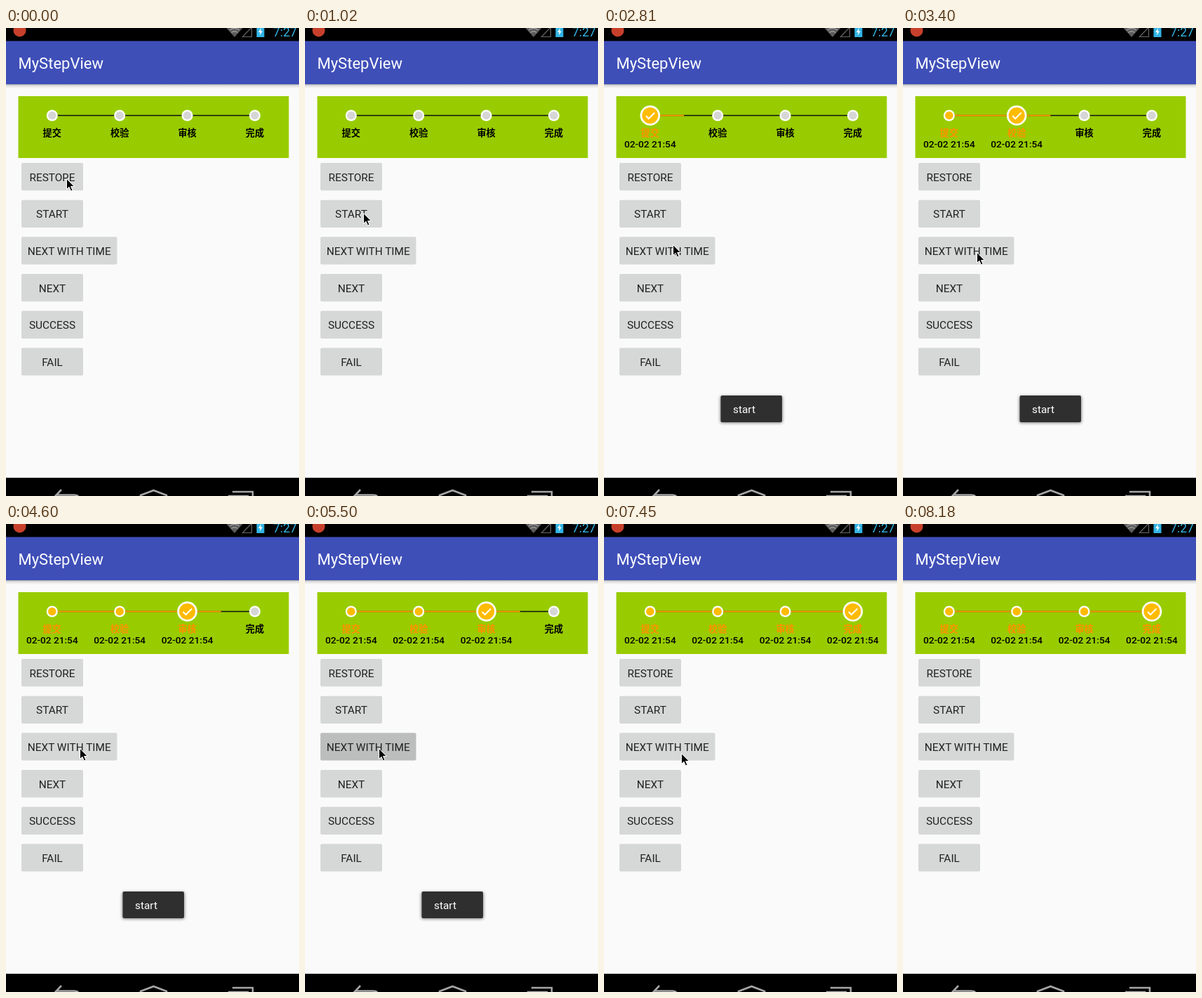
Animation of 418x666 px, one loop 8.84 s. Source, as an HTML page:

```html
<!DOCTYPE html>
<html lang="zh-CN">
<head>
<meta charset="utf-8">
<title>MyStepView</title>
<style>
  html, body { margin: 0; width: 100%; height: 100%; overflow: hidden; background: #fafafa; }
  svg { display: block; width: 100%; height: 100%; }
  text { font-family: Roboto, "Noto Sans CJK SC", "Noto Sans CJK", sans-serif; }
  .title { font-size: 22px; fill: #fff; }
  .clock { font-size: 17.6px; fill: #33b5e5; }
  .button rect { fill: #d6d7d7; }
  .button text { font-size: 15.4px; fill: #212121; text-anchor: middle; }
  .label { font-size: 13.2px; font-weight: 700; text-anchor: middle; }
  .time { font-size: 13.7px; font-weight: 500; text-anchor: middle; }
  .toast text { font-size: 15.4px; fill: #fff; }
  .nav { fill: none; stroke: #a6a6a6; stroke-width: 2.6; }

  .state, .cursor, .toast, .button rect { animation: 8840ms step-end infinite; }
  .state { visibility: hidden; }
  .state0 { animation-name: state0; }
  .state1 { animation-name: state1; }
  .state2 { animation-name: state2; }
  .state3 { animation-name: state3; }
  .state4 { animation-name: state4; }
  .restore rect { animation-name: pressRestore; }
  .start rect { animation-name: pressStart; }
  .timed rect { animation-name: pressTimed; }
  .cursor { animation-name: cursor; }
  .toast { animation-name: toast; }

  @keyframes state0 { 0% { visibility: visible } 21.71%, 100% { visibility: hidden } }
  @keyframes state1 { 0% { visibility: hidden } 21.71% { visibility: visible } 38.46%, 100% { visibility: hidden } }
  @keyframes state2 { 0% { visibility: hidden } 38.46% { visibility: visible } 52.03%, 100% { visibility: hidden } }
  @keyframes state3 { 0% { visibility: hidden } 52.03% { visibility: visible } 63.91%, 100% { visibility: hidden } }
  @keyframes state4 { 0% { visibility: hidden } 63.91%, 100% { visibility: visible } }

  @keyframes pressRestore { 0% { fill: #d6d7d7 } 1.58% { fill: #bcbdbd } 3.28%, 100% { fill: #d6d7d7 } }
  @keyframes pressStart { 0% { fill: #d6d7d7 } 20.02% { fill: #bcbdbd } 21.71%, 100% { fill: #d6d7d7 } }
  @keyframes pressTimed {
    0%, 38.46%, 52.03%, 63.91%, 100% { fill: #d6d7d7 }
    36.76%, 48.64%, 62.21% { fill: #bcbdbd }
  }

  @keyframes toast {
    0% { opacity: 0 }
    23.41% { opacity: .38 }
    25.11% { opacity: .78 }
    26.8% { opacity: 1 }
    63.91% { opacity: .6 }
    65.61% { opacity: .2 }
    67.3%, 100% { opacity: 0 }
  }

  @keyframes cursor {
    0% { transform: translate(86px, 214px) }
    4.86% { transform: translate(90px, 226px) }
    6.56% { transform: translate(101px, 256px) }
    8.25% { transform: translate(107px, 288px) }
    9.84% { transform: translate(94px, 275px) }
    11.53% { transform: translate(83px, 263px) }
    28.5% { transform: translate(85px, 270px) }
    30.2% { transform: translate(91px, 291px) }
    31.78% { transform: translate(98px, 308px) }
    33.48% { transform: translate(105px, 319px) }
    84.27% { transform: translate(110px, 326px) }
    85.97% { transform: translate(142px, 370px) }
    87.55% { transform: translate(198px, 450px) }
    89.25% { transform: translate(262px, 550px) }
    90.95% { transform: translate(315px, 640px) }
    92.53%, 100% { transform: translate(340px, 690px) }
  }
</style>
</head>
<body>
<svg viewBox="0 0 418 666" preserveAspectRatio="none">
  <defs>
    <linearGradient id="shade" x2="0" y2="1">
      <stop stop-opacity=".3"/>
      <stop offset=".4" stop-opacity=".1"/>
      <stop offset="1" stop-opacity="0"/>
    </linearGradient>
    <filter id="blur" x="-20%" y="-40%" width="140%" height="180%"><feGaussianBlur stdDeviation="2"/></filter>
  </defs>

  <rect width="418" height="666" fill="#fafafa"/>
  <rect y="80" width="418" height="6" fill="url(#shade)"/>
  <rect y="18" width="418" height="62" fill="#3f4fb8"/>
  <text class="title" x="17.5" y="58">MyStepView</text>

  <g id="status">
    <rect width="418" height="18.5"/>
    <circle cx="19.5" cy="3.5" r="9" fill="#c8402c"/>
    <path d="M314.500 0L326 13L337.500 0Z" fill="#5c5c5c"/>
    <path d="M319 3Q326-2 333 3M321.500 6.500Q326 3 330.500 6.500" fill="none" stroke="#999" stroke-width="1.500"/>
    <path d="M337.500 12.500H350.500V-1Z" fill="none" stroke="#666" stroke-width="1.200"/>
    <rect x="357.500" y="-4" width="11" height="17" fill="#33b5e5"/>
    <path d="M364 0L360 6H362.700L361.800 10.500L366 4.500H363.300Z" fill="#fff"/>
    <text class="clock" x="381" y="11.500">7:27</text>
  </g>

  <rect x="17.500" y="97" width="386" height="88" fill="#98cc00"/>
  <g id="steps"></g>
  <g id="buttons"></g>

  <g class="toast">
    <rect x="166" y="524" width="88.500" height="38" rx="2" opacity=".5" filter="url(#blur)"/>
    <rect x="166.500" y="523" width="87.500" height="38" rx="2" fill="#2f2f2f"/>
    <text x="184" y="548">start</text>
  </g>

  <rect y="636" width="418" height="4" fill="#fff"/>
  <rect y="640" width="418" height="26"/>
  <g class="nav">
    <path d="M79 657L69.500 667M72 664.500H97Q103 664.500 103.500 668"/>
    <path d="M192 670V665L210.500 658L229 665V670"/>
    <path d="M323 660H352V670M317 666H345V670"/>
  </g>

  <path class="cursor" d="M.5.500V15.500L4 12.300L6.500 18L9 17L6.600 11.500H11.300Z" stroke="#fff"/>
</svg>
<script>
  const steps = ["提交", "校验", "审核", "完成"];
  const gap = 96.4, lineY = 124.5;

  const line = (x1, x2, color, width) =>
    `<path d="M${x1} ${lineY}H${x2}" stroke="${color}" stroke-width="${width}"/>`;

  const disc = (x, r, color) => `<circle cx="${x}" cy="${lineY}" r="${r}" fill="${color}"/>`;

  function node(label, i, done) {
    const x = 65.8 + gap * i;
    const active = i < done, current = i === done - 1;
    let out = disc(x, current ? 14.3 : 8, "#fff") +
              disc(x, current ? 11.5 : 5.7, active ? "#ffbb00" : "#d6d6d6");
    if (current) {
      out += `<path d="M${x - 6} ${lineY + .5}l4 4l8.500-8.500" fill="none" stroke="#fff" stroke-width="2"/>`;
    }
    out += `<text class="label" x="${x}" y="154" fill="${active ? "#ff9000" : "#000"}">${label}</text>`;
    if (active) out += `<text class="time" x="${x}" y="170">02-02 21:54</text>`;
    return out;
  }

  // The coloured line runs half a gap past the current step.
  function stepView(done) {
    const first = 65.8, last = first + gap * 3;
    const reach = Math.min(last, first + gap * (done - .5));
    return `<g class="state state${done}">` + line(first, last, "#111", 1.3) +
      (done ? line(first, reach, "#f59a00", 2) : "") +
      steps.map((label, i) => node(label, i, done)).join("") + "</g>";
  }

  function button([label, name, width], i) {
    const y = 192 + 52.65 * i;
    return `<g class="button ${name}"><rect x="22" y="${y}" width="${width}" height="39.300" rx="2"/>` +
      `<text x="${22 + width / 2}" y="${y + 25.7}">${label}</text></g>`;
  }

  const buttons = [
    ["RESTORE", "restore", 88], ["START", "start", 88], ["NEXT WITH TIME", "timed", 136.5],
    ["NEXT", "next", 88], ["SUCCESS", "success", 88], ["FAIL", "fail", 88]
  ];

  document.getElementById("steps").innerHTML = [0, 1, 2, 3, 4].map(stepView).join("");
  document.getElementById("buttons").innerHTML = buttons.map(button).join("");
</script>
</body>
</html>
```
